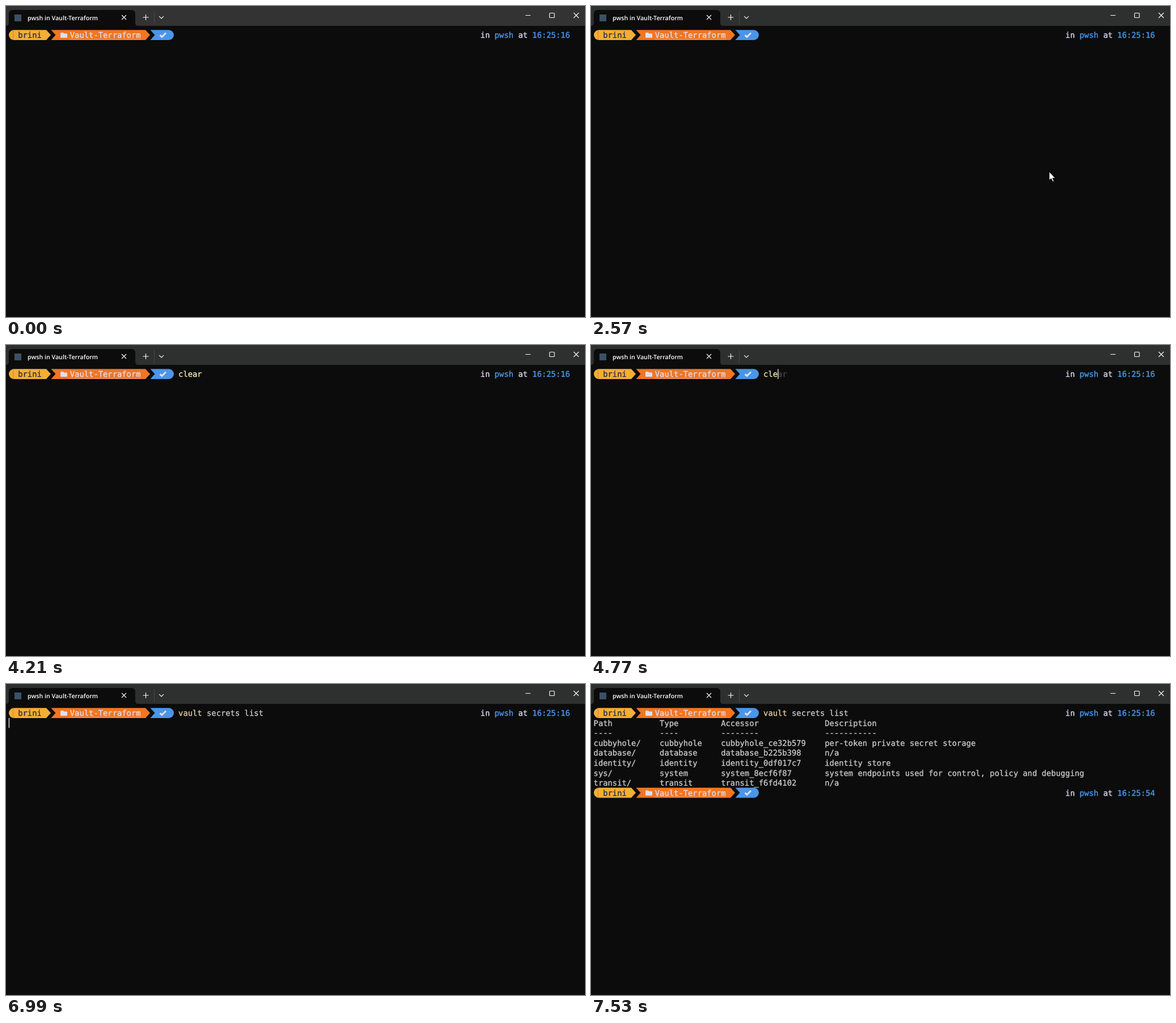
Animation, 1021 px wide and 548 px high, one loop 8 s. Source, as an HTML page:

```html
<!DOCTYPE html>
<html lang="en">
<head>
<meta charset="utf-8">
<title>Terminal</title>
<style>
  html, body { margin: 0; width: 100%; height: 100%; overflow: hidden; background: #0c0c0c; }
  svg { display: block; }
  text {
    font: 13.82px "DejaVu Sans Mono", monospace;
    text-rendering: geometricPrecision;
    white-space: pre;
    stroke-width: .3;
  }
  .title { font: 600 10.7px "Open Sans", "Noto Sans", sans-serif; fill: #fff; }
  .strong { stroke-width: .5; }
  .icon { fill: none; stroke: #fff; stroke-width: 1.1; }
</style>
</head>
<body>
<svg width="1021" height="548" viewBox="0 0 1021 548">
  <defs>
    <g id="prompt">
      <path fill="#f3ae35" d="M13.800 42.300H71L79 51.100L71 59.900H13.800A8.800 8.800 0 0 1 13.800 42.300Z"/>
      <path stroke="#c88a24" d="M12.500 42.300V59.900"/>
      <path fill="#f07623" d="M79.500 42.300H246L254 51.100L246 59.900H79.500L87.500 51.100Z"/>
      <path fill="#4b95e9" d="M254.500 42.300H287.200A8.800 8.800 0 0 1 287.200 59.900H254.500L262.500 51.100Z"/>
      <text x="21.2" y="56.2" fill="#262b44" stroke="#262b44">brini</text>
      <path fill="#e0def4" d="M96 48Q96 47 97 47H101L102.500 48.500H107Q108 48.500 108 49.500V55Q108 56 107 56H97Q96 56 96 55Z"/>
      <text x="112.800" y="56.2" fill="#e0def4" stroke="#e0def4">Vault-Terraform</text>
      <path stroke="#e0def4" stroke-dasharray="1 1" opacity=".75" d="M113 58.500H238"/>
      <path fill="none" stroke="#e0def4" stroke-width="3" d="M271.500 51.500L275 54.500L282 47.500"/>
    </g>
  </defs>
  <rect width="1021" height="548" fill="#0c0c0c"/>
  <rect id="bar" width="1021" height="35"/>
  <path fill="#0c0c0c" d="M0 35Q5 35 5 30V14Q5 7 12 7H221Q228 7 228 14V30Q228 35 233 35Z"/>
  <rect x="15" y="15" width="12" height="12" fill="#3b5068"/>
  <text class="title" x="38" y="25">pwsh in Vault-Terraform</text>
  <path stroke="#484848" d="M261.500 9V32"/>
  <path class="icon" d="M204 16L212 24M212 16L204 24M241.500 20H251.500M246.500 15V25
    M270 18.200L274 22L278 18.200M916 16.500H925M1001 12L1010 21M1010 12L1001 21"/>
  <rect class="icon" x="958.500" y="12.500" width="8.500" height="8" rx="1"/>
  <use href="#prompt"/>
  <g id="screen"></g>
  <path id="pointer" fill="#fff" stroke="#000" stroke-width=".8"
    d="M0 0V15L3.500 12L6 17.500L8.300 16.500L5.900 11.300H10.500Z"/>
</svg>
<script>
const LOOP = 8000, CELL = 8.32, ROW = 17.56;
const BLUE = '#468ede', PALE = '#e0def4';
const $ = id => document.getElementById(id);
const colX = col => 4.6 + col * CELL;

// [start, typed, suggestion, cursor shown]
const edits = [
  [0, '', '', 0], [2030, '', '', 1], [2570, '', '', 0],
  [3030, 'v', '', 1], [3100, 'v', 'ault secrets list', 1],
  [3650, 'clear', '', 1], [4210, 'clear', '', 0],
  [4640, 'clea', 'r', 1], [4770, 'cle', 'ar', 1], [4890, 'cl', 'ear', 1],
  [4990, 'c', 'lear', 1], [5090, '', '', 1],
  [5650, 'v', 'ault secrets list', 1], [5930, 'va', 'ult secrets list', 1],
  [6270, 'vault secrets list', '', 1], [6860, 'vault secrets list', '', 0]
];

// [start, tip y]; a missing y hides the pointer
const moves = [[0], [70, 512], [130, 432], [190, 366], [1760, 340],
  [1850, 320], [1940, 302], [2030, 292], [3030]];

const table = [
  ['Path', 'Type', 'Accessor', 'Description'],
  ['----', '----', '--------', '-----------'],
  ['cubbyhole/', 'cubbyhole', 'cubbyhole_ce32b579', 'per-token private secret storage'],
  ['database/', 'database', 'database_b225b398', 'n/a'],
  ['identity/', 'identity', 'identity_0df017c7', 'identity store'],
  ['sys/', 'system', 'system_8ecf6f87', 'system endpoints used for control, policy and debugging'],
  ['transit/', 'transit', 'transit_f6fd4102', 'n/a']
];
const columns = [0, 14, 27, 49];

const at = (list, t) => list.findLast(step => step[0] <= t);

const put = (col, row, str, color = '#ccc', cls = '') =>
  `<text class="${cls}" x="${colX(col)}" y="${56.2 + row * ROW}" fill="${color}" stroke="${color}">${str}</text>`;

const cursor = (col, row) =>
  `<rect x="${colX(col) + .2}" y="${42.3 + row * ROW}" width="1.2" height="${ROW}" fill="#fff"/>`;

const clock = (row, time) =>
  put(100, row, 'in', PALE) + put(103, row, 'pwsh', BLUE, 'strong') +
  put(108, row, 'at', PALE) + put(111, row, time, BLUE, 'strong');

function screen(t) {
  const [, typed, hint, shown] = at(edits, t);
  const word = typed.split(' ')[0], end = 36 + typed.length;
  let out = clock(0, '16:25:16') +
    put(36, 0, word, word[0] === 'c' ? '#f0ebb0' : '#e8d0a8') +
    put(36 + word.length, 0, typed.slice(word.length)) +
    put(end, 0, hint, '#444');
  if (shown) out += cursor(end, 0);
  if (t >= 6990 && t < 7270) out += cursor(0, 1);
  if (t >= 7270) {
    out += table.map((cells, r) => cells.map((s, c) => put(columns[c], r + 1, s)).join('')).join('');
  }
  if (t >= 7270 && t < 7410) out += cursor(0, 8);
  if (t >= 7410) out += `<use href="#prompt" y="${8 * ROW}"/>`;
  if (t >= 7530) out += clock(8, '16:25:54');
  return out;
}

let last;
function draw(now) {
  const t = now % LOOP, html = screen(t), y = at(moves, t)[1];
  if (html !== last) $('screen').innerHTML = last = html;
  $('bar').setAttribute('fill', t < 2030 ? '#333' : '#2e2f2f');
  $('pointer').setAttribute('visibility', y ? 'visible' : 'hidden');
  if (y) $('pointer').setAttribute('transform', `translate(808 ${y})`);
  requestAnimationFrame(draw);
}
draw(0);
</script>
</body>
</html>
```
